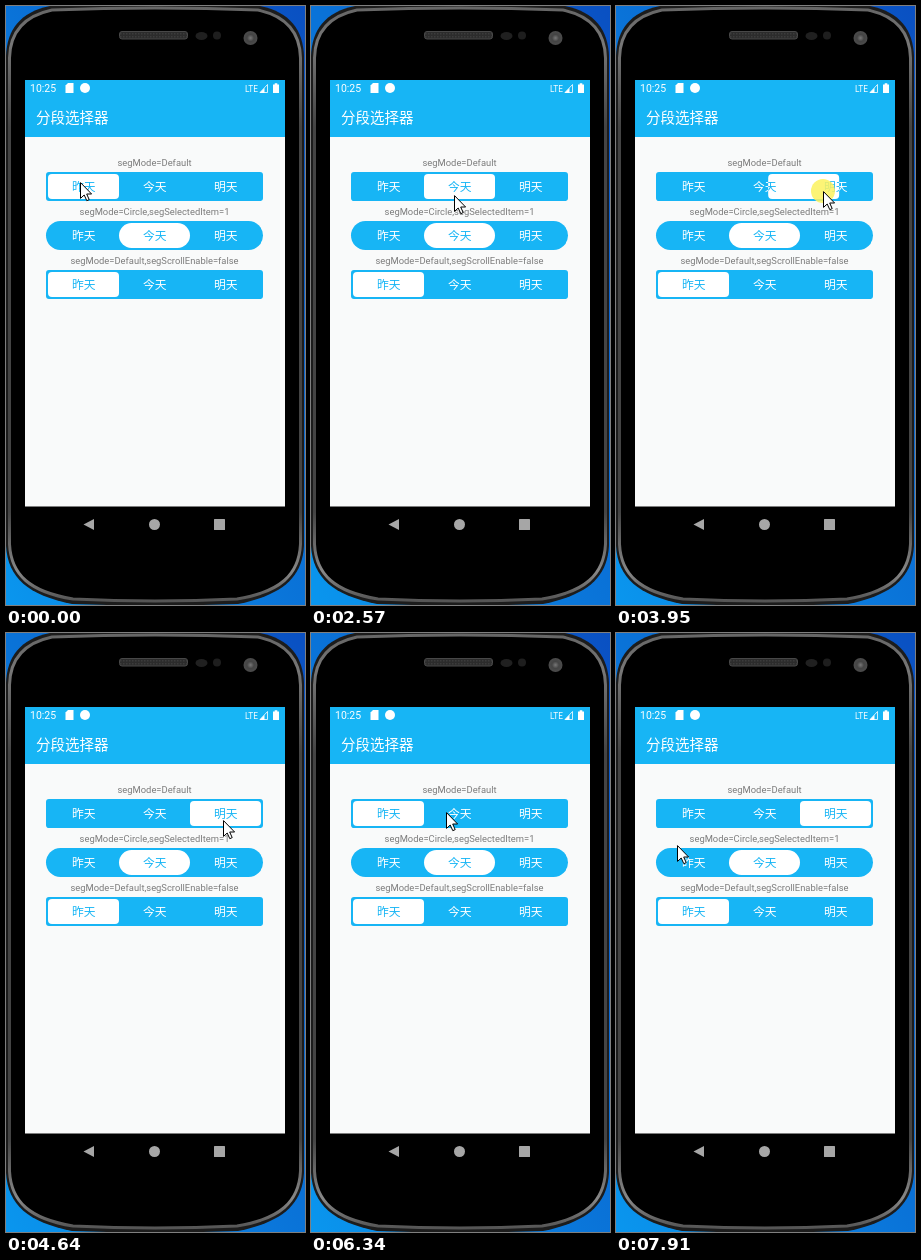
Animation, 299 px wide and 599 px high, one loop 7.99 s. Source, as an HTML page:

```html
<!DOCTYPE html>
<html lang="zh-CN">
<head>
<meta charset="utf-8">
<title>分段选择器</title>
<style>
  html, body { margin: 0; width: 100%; height: 100%; overflow: hidden; background: #0879dc; }
  svg { display: block; width: 299px; height: 599px; }
  text { font-family: Roboto, "Noto Sans CJK SC", "Noto Sans CJK", sans-serif; }
  .cjk { font-family: "Noto Sans CJK SC", "Noto Sans CJK", "Noto Sans", sans-serif; }
  .seg { font-size: 11.8px; text-anchor: middle; }
  .label { font-size: 9.4px; text-anchor: middle; fill: #7c7c7c; }
</style>
</head>
<body>
<svg viewBox="0 0 299 599">
  <defs>
    <linearGradient id="desk" x1="0" y1="1" x2="1" y2="0">
      <stop stop-color="#0a96ee"/><stop offset="1" stop-color="#0a50c2"/>
    </linearGradient>
    <linearGradient id="rim" x2="0" y2="1">
      <stop stop-color="#666"/><stop offset=".06" stop-color="#777"/><stop offset=".2" stop-color="#444"/>
      <stop offset=".85" stop-color="#444"/><stop offset=".95" stop-color="#888"/><stop offset="1" stop-color="#555"/>
    </linearGradient>
    <radialGradient id="lens">
      <stop stop-color="#777"/><stop offset=".5" stop-color="#444"/><stop offset="1" stop-color="#4c4c4c"/>
    </radialGradient>
    <pattern id="mesh" width="3" height="3" patternUnits="userSpaceOnUse">
      <rect width="3" height="3" fill="#2c2c2c"/><rect width="1.5" height="1.5" fill="#3c3c3c"/>
    </pattern>
  </defs>

  <rect width="299" height="599" fill="url(#desk)"/>
  <path d="M0 50C1 24 14 6 44 0H254C284 6 297 24 298 50V540C296 572 276 589 232 598Q149 601 66 598C22 589 2 572 0 540Z" fill="#1c1c1c"/>
  <path d="M3.500 52C4 26 18 10 46 4Q149 0 252 4C280 10 294 26 294.500 52V538C293 569 274 586 231 593Q149 597 67 593C24 586 5 569 3.500 538Z" fill="#000" stroke="url(#rim)" stroke-width="3"/>

  <rect x="113.500" y="25.500" width="68" height="7.500" rx="2.500" fill="url(#mesh)" stroke="#484848"/>
  <ellipse cx="195.500" cy="30" rx="6" ry="4" fill="#202020"/>
  <circle cx="211" cy="29.500" r="4" fill="#1e1e1e"/>
  <circle cx="244.500" cy="32" r="7" fill="url(#lens)"/>

  <rect x="19" y="74" width="260" height="426.500" fill="#f9fafa"/>
  <rect x="19" y="74" width="260" height="57" fill="#17b5f5"/>

  <g fill="#fff">
    <text x="24" y="86" font-size="10.500">10:25</text>
    <path d="M62 77H67.500V87H59.500V79.500Z"/>
    <circle cx="79" cy="82" r="5"/>
    <text x="239" y="85.500" font-size="8.300">LTE</text>
    <path d="M253.500 87L258.500 82V87Z"/>
    <path d="M254 86.500L261.500 78.500V86.500Z" fill="none" stroke="#fff" stroke-width=".8"/>
    <path d="M267 78.500H268.700V77.300H271.300V78.500H273V87H267Z"/>
    <text class="cjk" x="30" y="116.500" font-size="14.500" font-weight="500">分段选择器</text>
  </g>

  <g id="rows"></g>

  <g fill="#a6a6a6">
    <path d="M77.500 518.500L88 513V524Z"/>
    <circle cx="148.500" cy="518.500" r="5.500"/>
    <rect x="208" y="513" width="11" height="11" rx=".5"/>
  </g>

  <g id="pointer">
    <circle id="press" r="12" fill="#fbf25f" opacity=".86"/>
    <path d="M.5 .6V16.400L4.200 13L6.800 18.700L9.200 17.600L6.700 12H11.600Z" fill="#fff" stroke="#000" stroke-linejoin="round"/>
  </g>
</svg>

<script>
const BLUE = '#17b5f5';
const DAYS = ['昨天', '今天', '明天'];
const LEFT = 42, SLOT = 71;
const LOOP = 7990, STEP = LOOP / 103, SNAP = 250;
const $ = id => document.getElementById(id);
const slotX = slot => LEFT + slot * SLOT;

const rows = [
  { caption: 'segMode=Default', slot: 0 },
  { caption: 'segMode=Circle,segSelectedItem=1', slot: 1, round: true },
  { caption: 'segMode=Default,segScrollEnable=false', slot: 0 }
];

function days(y, fill, extra = '') {
  return `<g fill="${fill}" ${extra}>` + DAYS.map((day, i) =>
    `<text class="seg cjk" x="${slotX(i) + 35.7}" y="${y + 18.6}">${day}</text>`).join('') + '</g>';
}

$('rows').innerHTML = rows.map(({ caption, slot, round }, i) => {
  const y = 166 + i * 49;
  const thumb = `class="thumb${i}" x="${slotX(slot)}" y="${y + 2}" width="${SLOT}" height="25" rx="${round ? 12.5 : 4}"`;
  return `<text class="label" x="148.5" y="${y - 6.3}">${caption}</text>
    <rect x="40" y="${y}" width="217" height="29" rx="${round ? 14.5 : 3}" fill="${BLUE}"/>
    ${days(y, '#fff')}
    <clipPath id="clip${i}"><rect ${thumb}/></clipPath>
    <rect ${thumb} fill="#fff"/>
    ${days(y, BLUE, `clip-path="url(#clip${i})"`)}`;
}).join('');
const thumbs = document.querySelectorAll('.thumb0');

// Turning points of the hand: time, x, y.
const path = [
  [0, 74, 176], [230, 75, 175], [1390, 105, 179], [2170, 124, 182], [2570, 144, 189],
  [2860, 168, 184], [3950, 207, 185], [4350, 218, 194], [4720, 217, 185], [5270, 169, 183],
  [5580, 174, 181], [6090, 135, 178], [6340, 137, 179], [6630, 112, 179],
  [7200, 225, 178], [7350, 225, 178], [7910, 61, 212]
];

// Press and release times of each drag.
const drags = [[230, 2290], [2860, 4140], [4720, 5170], [5580, 6090], [6630, 7350]];

function hand(t) {
  const i = Math.max(1, path.findIndex(point => point[0] >= t));
  const [t0, x0, y0] = path[i - 1], [t1, x1, y1] = path[i];
  const k = (t - t0) / (t1 - t0);
  return { x: x0 + (x1 - x0) * k, y: y0 + (y1 - y0) * k };
}

// The thumb follows each drag, then eases into the nearest slot.
function thumbX(t) {
  let x = LEFT;
  for (const [down, up] of drags) {
    if (t < down) break;
    x += hand(Math.min(t, up)).x - hand(down).x;
    x = Math.min(slotX(2), Math.max(LEFT, x));
    if (t < up) break;
    const rest = slotX(Math.round((x - LEFT) / SLOT));
    const left = 1 - Math.min(1, (t - up) / SNAP);
    x = rest + (x - rest) * left ** 2;
  }
  return x;
}

function draw(time) {
  const t = Math.min(Math.floor((time % LOOP + 22) / STEP) % 103 * STEP, 7910);
  const { x, y } = hand(t);
  $('pointer').setAttribute('transform', `translate(${Math.round(x)} ${Math.round(y)})`);
  $('press').style.display = drags.some(([down, up]) => t >= down && t < up) ? '' : 'none';
  thumbs.forEach(thumb => thumb.setAttribute('x', thumbX(t)));
}

let start;
function frame(now) {
  start ??= now;
  draw(now - start);
  requestAnimationFrame(frame);
}
draw(0);
requestAnimationFrame(frame);
</script>
</body>
</html>
```
